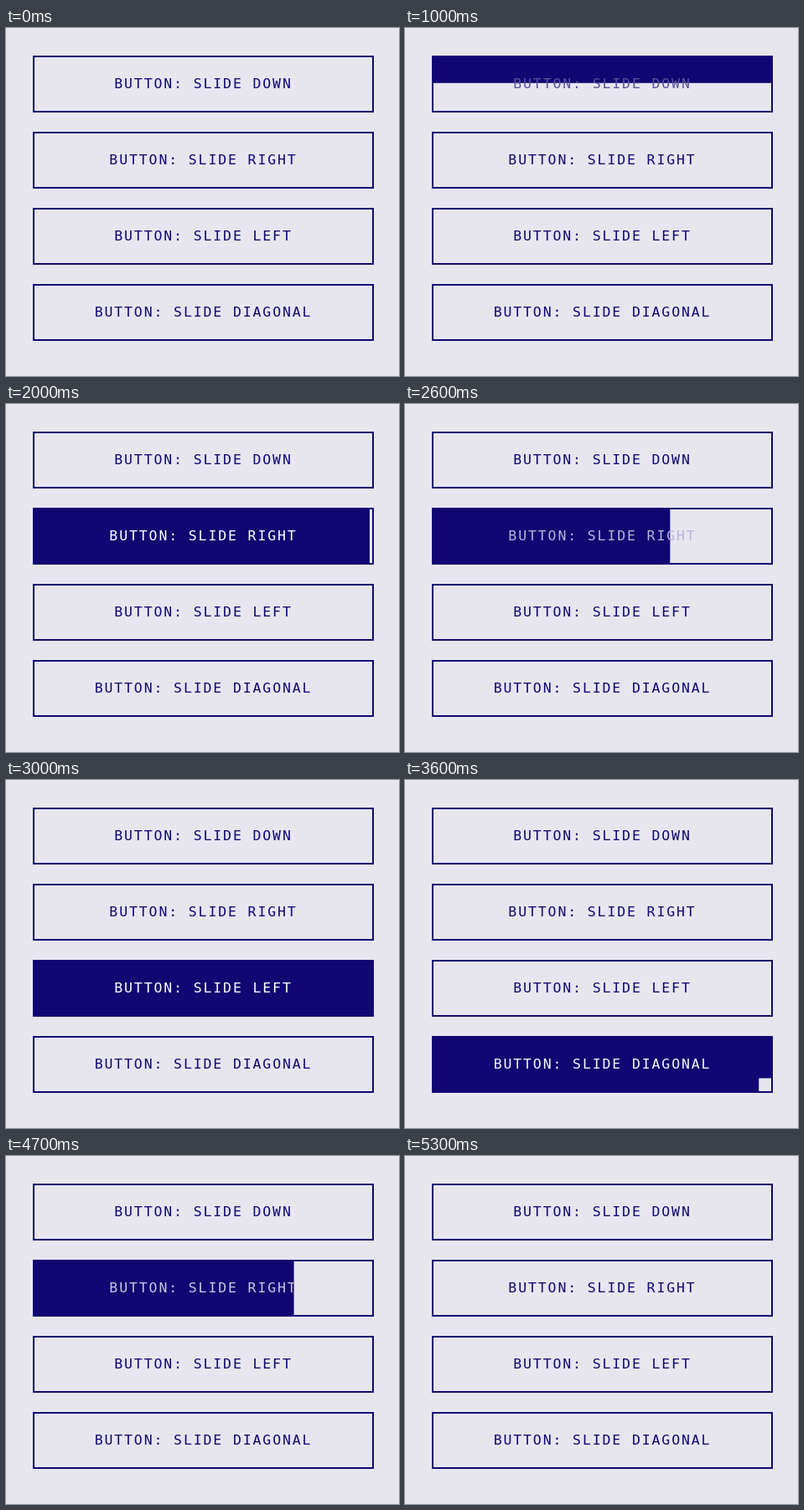
These frames come from a looping animation (469x416 px, 5400 ms). An HTML page:

```html
<!DOCTYPE html>
<html lang="en">
<head>
<meta charset="utf-8">
<title>Slide buttons</title>
<style>
  html, body {
    margin: 0;
    width: 100%;
    height: 100%;
    overflow: hidden;
    background: #e7e6ef;
  }
  .button {
    position: absolute;
    left: 32px;
    width: 403px;
    height: 64px;
    border: 2px solid #110672;
    color: #110672;
    font: 16.5px/63px "DejaVu Sans Mono", monospace;
    letter-spacing: 1.87px;
    text-align: center;
    white-space: nowrap;
  }
</style>
</head>
<body>
<script>
const LOOP = 5400, STEP = 100, FADE = 300;
const NAVY = [17, 6, 114], WHITE = [255, 255, 255];

// shadow: inset x, y and spread when hovered; hovers: [enter, leave] in ms
const buttons = [
  { label: "DOWN",     shadow: [0, 100, 0],  hovers: [[940, 1598], [4720, 4980]] },
  { label: "RIGHT",    shadow: [400, 0, 0],  hovers: [[1685, 2543], [4340, 4657]] },
  { label: "LEFT",     shadow: [0, 0, 50],   hovers: [[2630, 3250], [4060, 4285]] },
  { label: "DIAGONAL", shadow: [400, 50, 0], hovers: [[3340, 4071]] }
];

buttons.forEach((b, i) => {
  b.el = document.createElement("div");
  b.el.className = "button";
  b.el.style.top = 33 + 91 * i + "px";
  b.el.textContent = "BUTTON: SLIDE " + b.label;
  document.body.append(b.el);
});

// cubic-bezier(0, 0, .58, 1), solved for its parameter by bisection
function easeOut(x) {
  if (x <= 0) return 0;
  if (x >= 1) return 1;
  let lo = 0, hi = 1;
  for (let i = 0; i < 24; i++) {
    const s = (lo + hi) / 2;
    if (1.74 * (1 - s) * s * s + s ** 3 < x) lo = s;
    else hi = s;
  }
  return lo * lo * (3 - 2 * lo);
}

const fill = (hovers, t) => hovers.reduce((sum, [enter, leave]) =>
  sum + easeOut((t - enter) / FADE) * (1 - easeOut((t - leave) / FADE)), 0);

const mix = (a, b, k) => `rgb(${a.map((v, i) => Math.round(v + (b[i] - v) * k))})`;

function draw(now) {
  const t = Math.floor((now % LOOP) / STEP) * STEP;
  for (const { el, shadow, hovers } of buttons) {
    const k = fill(hovers, t);
    const [x, y, spread] = shadow.map(v => (v * k).toFixed(2) + "px");
    el.style.boxShadow = `inset ${x} ${y} 0 ${spread} rgb(${NAVY})`;
    el.style.color = mix(NAVY, WHITE, k);
  }
}

const start = performance.now();
function tick() {
  draw(performance.now() - start);
  requestAnimationFrame(tick);
}
tick();
</script>
</body>
</html>
```
